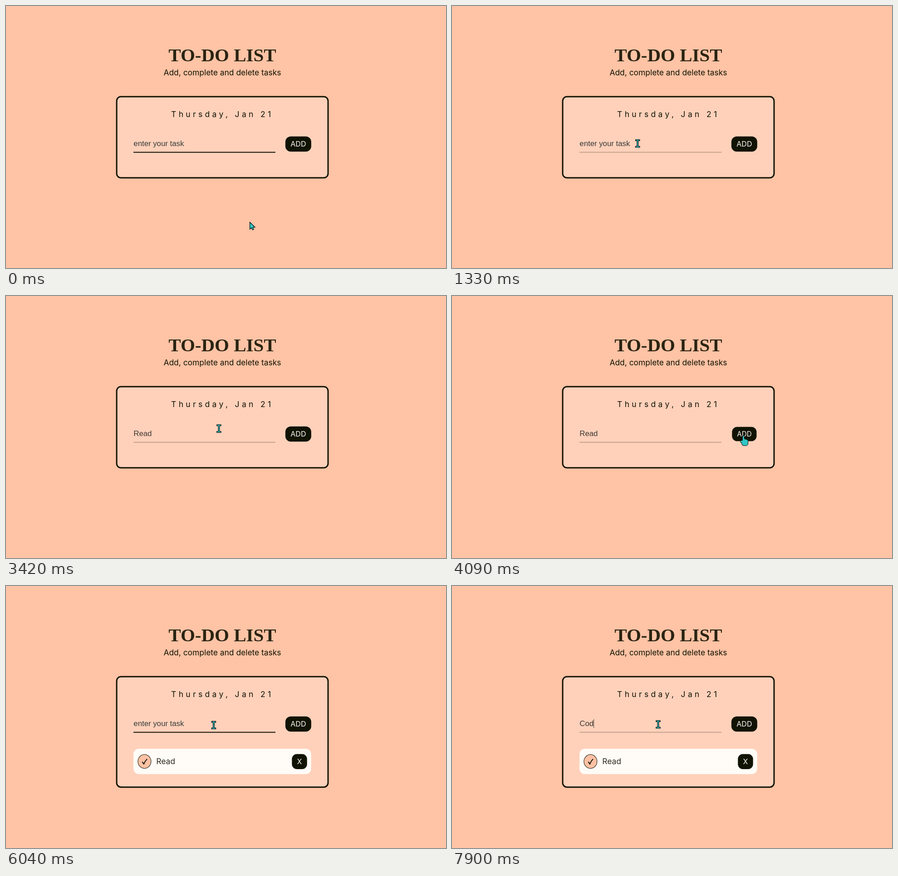
Recreate the animation shown at these times as an HTML page with a canvas. Size 970x578 px, loop 8 s.

```html
<!DOCTYPE html>
<html lang="en">
<head>
<meta charset="utf-8">
<title>To-do list</title>
<style>
html, body { margin: 0; width: 100%; height: 100%; overflow: hidden; background: #ffc3a5; }
canvas { display: block; width: 970px; height: 578px; }
</style>
</head>
<body>
<canvas id="stage" width="970" height="578"></canvas>
<script>
const ctx = document.getElementById('stage').getContext('2d');
const LOOP = 8000, BLINK = 515, FADE = 60;
const INK = '#111302', PEACH = '#ffc3a5', CARD = '#ffd1bb', CREAM = '#fffcf7', TEAL = '#2fc5c5';
const SANS = 'Inter, Roboto, sans-serif';
const BODY = '17.4px ' + SANS, LABEL = '16px ' + SANS;
const INPUT = '16.8px "Liberation Sans", Arial, sans-serif';
const TITLE = 'bold 41px "Liberation Serif", "Times New Roman", serif';
const ADDED = 4530;

// Each move eases the pointer to a new place; bend bows the way up or down.
const home = { x: 537, y: 476 };
const moves = [
  { start: 60, end: 120, x: 371, y: 297, bend: 0 },
  { start: 1050, end: 1330, x: 409.2, y: 303.4, bend: 0 },
  { start: 3100, end: 3900, x: 642, y: 309, bend: -17 },
  { start: 5490, end: 6150, x: 454.5, y: 305.4, bend: 25 }
];
// Each entry holds the field's focus and the keys typed at an even pace.
const entries = [
  { focus: 520, blur: 4250, word: 'Read', from: 1870, pace: 223 },
  { focus: 6540, blur: LOOP, word: 'Cod', from: 7530, pace: 185 }
];
const clicks = [
  { start: 520, end: 690 }, { start: 4250, end: ADDED }, { start: 6540, end: 6760 }
];

const ramp = (t, start, end) => Math.min(1, Math.max(0, (t - start) / (end - start)));
const easeInOut = k => k < .5 ? 4 * k ** 3 : 1 - 4 * (1 - k) ** 3;

function pointerAt(t) {
  let { x, y } = home;
  for (const move of moves) {
    const k = easeInOut(ramp(t, move.start, move.end));
    x += (move.x - x) * k;
    y += (move.y - y) * k + move.bend * Math.sin(Math.PI * k);
  }
  return { x, y };
}

function text(str, x, y, font, color, align = 'left', spacing = 0) {
  ctx.font = font;
  ctx.fillStyle = color;
  ctx.textAlign = align;
  ctx.letterSpacing = spacing + 'px';
  ctx.fillText(str, x, y);
}

function box(x, y, w, h, r, fill, stroke) {
  ctx.beginPath();
  ctx.roundRect(x, y, w, h, r);
  ctx.fillStyle = fill;
  ctx.fill();
  if (stroke) {
    ctx.lineWidth = 3;
    ctx.strokeStyle = stroke;
    ctx.stroke();
  }
}

function disc(x, y, rx, ry, fill) {
  ctx.beginPath();
  ctx.ellipse(x, y, rx, ry, 0, 0, Math.PI * 2);
  ctx.fillStyle = fill;
  ctx.fill();
}

function handShape() {
  const shape = new Path2D();
  shape.roundRect(-1, 0, 3, 14, 1.5);
  for (let i = 1; i < 4; i++) shape.roundRect(-1 + 2.8 * i, 5.4 + i, 2.8, 8, 1.4);
  shape.roundRect(-5.3, 10, 6, 4.5, 2);
  shape.roundRect(-3, 11, 13, 9.7, [1, 2, 4, 5]);
  return shape;
}

const arrow = new Path2D('M.5 .7V16.6L4.1 13.2L6.5 18L9.3 16.8L7 12.2H12.2Z');
const beam = new Path2D('M-4.7 -8.6H4.7V-6H1.4V6H4.7V8.6H-4.7V6H-1.4V-6H-4.7Z');
const hand = handShape();

function drawPointer(t) {
  const { x, y } = pointerAt(t);
  const overInput = x > 281 && x < 594 && y > 284 && y < 324;
  const overButton = x > 616 && x < 673 && y > 288 && y < 321;
  const shape = overInput ? beam : overButton ? hand : arrow;
  ctx.save();
  ctx.translate(x, y);
  ctx.lineJoin = 'round';
  ctx.strokeStyle = '#0b1212';
  ctx.fillStyle = TEAL;
  if (shape === hand) {
    ctx.lineWidth = 2;
    ctx.stroke(shape);
    ctx.fill(shape);
  } else {
    ctx.lineWidth = 1.2;
    ctx.fill(shape);
    ctx.stroke(shape);
  }
  ctx.restore();
  if (clicks.some(c => t >= c.start && t < c.end)) disc(x, y, 13.5, 13.5, 'rgba(255,255,0,.47)');
}

function drawInput(t) {
  const entry = entries.find(e => t >= e.focus && t < (e.blur < LOOP ? ADDED : LOOP));
  const focused = entry && t < entry.blur;
  const keys = entry ? Math.min(entry.word.length, Math.max(0, Math.floor((t - entry.from) / entry.pace) + 1)) : 0;
  const value = keys ? entry.word.slice(0, keys) : '';
  const color = value && focused ? '#3f3732' : '#343a37';
  text(value || 'enter your task', 281.3, 309.2, INPUT, color);

  ctx.globalAlpha = focused ? 1 - .76 * ramp(t, entry.focus, entry.focus + FADE) : 1;
  ctx.fillStyle = INK;
  ctx.fillRect(281, 321.7, 313, 2);
  ctx.globalAlpha = 1;

  // Every key press restarts the caret's blink.
  if (!focused) return;
  const lastEvent = keys ? entry.from + (keys - 1) * entry.pace : entry.focus;
  if (Math.floor((t - lastEvent) / BLINK) % 2 === 0) {
    ctx.fillStyle = color;
    ctx.fillRect(281 + Math.round(ctx.measureText(value).width), 294, 1, 19);
  }
}

function drawButton(t) {
  const scale = 1 - .05 * (ramp(t, 3660, 3780) - ramp(t, 5680, 5800));
  ctx.save();
  ctx.translate(644.4, 304.5);
  ctx.scale(scale, scale);
  box(-28.5, -16.7, 57, 33.4, 12, INK);
  text('ADD', 0, 5.8, LABEL, CREAM, 'center');
  ctx.restore();
}

function drawTask() {
  box(281, 359, 391.7, 56, 12, CREAM);
  disc(305.3, 387.1, 15, 15.8, INK);
  disc(305.3, 387.1, 14, 14.8, '#fdc1a4');
  ctx.strokeStyle = INK;
  ctx.lineWidth = 2;
  ctx.stroke(new Path2D('M300.3 387.8L303.9 392.6Q306.5 386 311 381.6'));
  text('Read', 331.2, 393.2, BODY, '#2b2b20');
  box(630.3, 370.7, 33.4, 33.3, 11, INK);
  text('X', 647, 393, LABEL, CREAM, 'center');
}

function draw(t) {
  const added = t >= ADDED;
  ctx.fillStyle = PEACH;
  ctx.fillRect(0, 0, 970, 578);
  text('TO-DO LIST', 477, 122, TITLE, '#2a2412', 'center');
  text('Add, complete and delete tasks', 477, 152.8, BODY, INK, 'center');
  box(244, 200, 466, added ? 243.7 : 179, 9.5, CARD, INK);
  text('Thursday, Jan 21', 364, 245.3, BODY, INK, 'left', 5.4);
  drawInput(t);
  drawButton(t);
  if (added) drawTask();
  drawPointer(t);
}

function loop() {
  draw(performance.now() % LOOP);
  requestAnimationFrame(loop);
}
loop();
</script>
</body>
</html>
```
